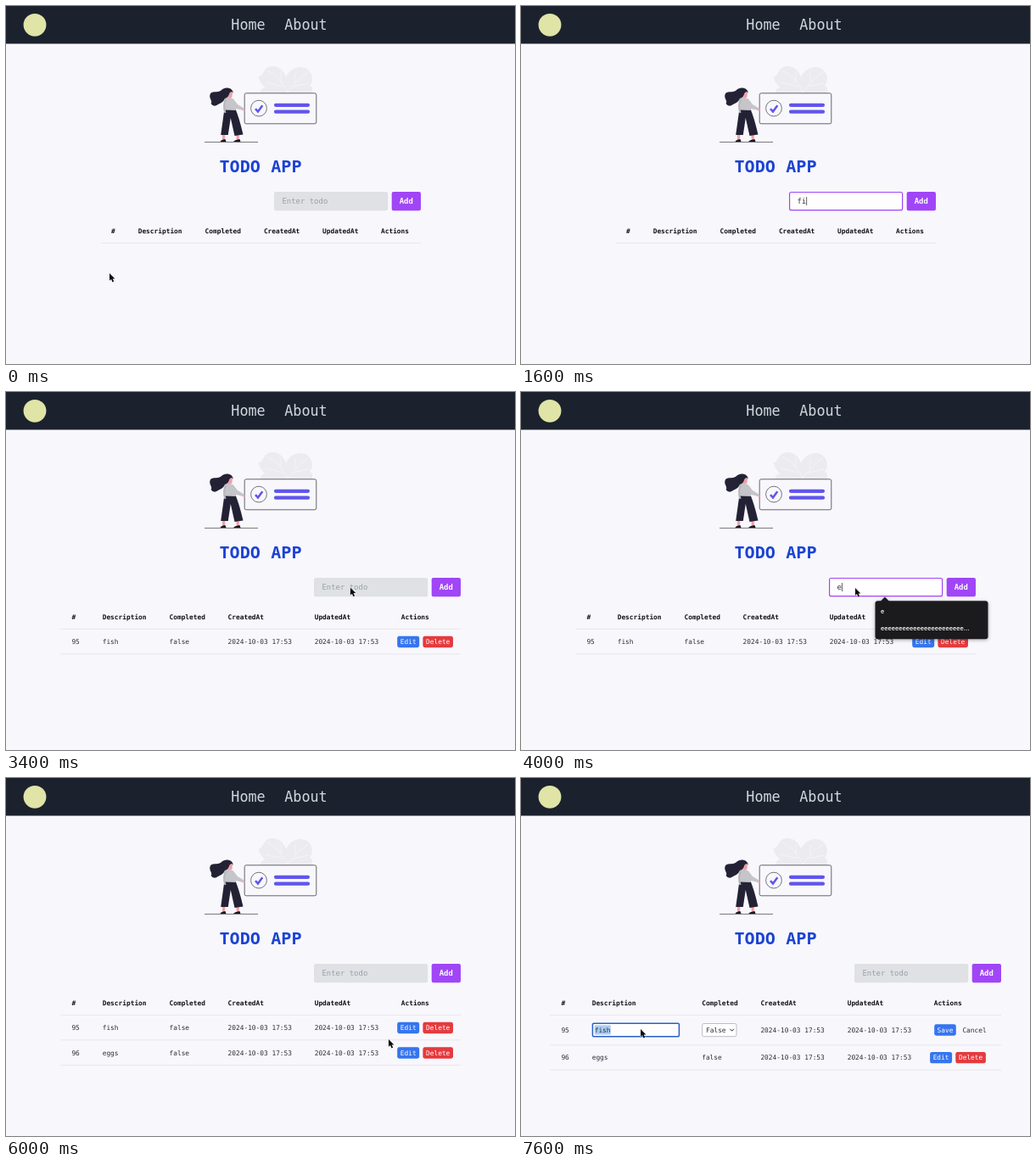
Write an HTML page that moves like this. It is 600 px wide and 422 px high and loops after 8000 ms.

```html
<!DOCTYPE html>
<html lang="en">
<head>
<meta charset="utf-8">
<title>Todo app</title>
<style>
  html, body { margin: 0; width: 100%; height: 100%; overflow: hidden; background: #f8f7fc; }
  svg { display: block; width: 600px; height: 422px; }
  text { font-family: "DejaVu Sans Mono", "Liberation Mono", monospace; font-size: 7.84px; fill: #2b2f38; white-space: pre; }
  .nav { font-size: 16.8px; fill: #d3d6dc; }
  .title { font-size: 20.16px; font-weight: 700; fill: #1b43d4; text-anchor: middle; }
  .field { font-size: 8.96px; fill: #343a46; }
  .hint { fill: #9aa0aa; }
  .add { font-size: 8.96px; font-weight: 700; fill: #fff; text-anchor: middle; }
  .head { font-weight: 700; fill: #111216; }
  .btn { fill: #fff; text-anchor: middle; }
  .menu { font-family: Inter, Roboto, sans-serif; font-size: 7.2px; font-weight: 600; fill: #f0f0f2; }
</style>
</head>
<body>
<svg viewBox="0 0 600 422">
  <rect width="600" height="422" fill="#f8f7fc"/>
  <rect width="600" height="44.5" fill="#1b222e"/>
  <circle cx="34" cy="22.3" r="13.4" fill="#e0e4a6"/>
  <text class="nav" x="265.3" y="28">Home</text>
  <text class="nav" x="328.2" y="28">About</text>

  <!-- leaves -->
  <g fill="#ecebef">
    <path d="M333 104C319 102 301 100 297.500 83C304 84 302 72 313 71C326 70 334 84 333 104Z"/>
    <path d="M331 104C324 88 332 74 346 72C359 71 365 86 358 94L361 96V104Z"/>
    <path d="M300 104C298 97 306 95 312 96L334 104Z"/>
  </g>
  <g fill="none" stroke="#f8f7fc" stroke-width=".7">
    <path d="M333 104Q325 84 308 76M324 90V77M327 95L306 90M331 104Q341 88 356 78M341 91V78M338 95L357 91"/>
  </g>

  <!-- card -->
  <rect x="281.200" y="102.800" width="84.600" height="36" rx="2" fill="#f8f7fc" stroke="#55545e" stroke-width=".9"/>
  <circle cx="298" cy="120.600" r="9.400" fill="none" stroke="#55545e" stroke-width=".8"/>
  <path d="M294 121.200L297 124.600L302.300 117.200" fill="none" stroke="#6054ef" stroke-width="2.500"/>
  <path d="M318 116.800H356M318 124.700H356" stroke="#6155ec" stroke-width="4.200" stroke-linecap="round"/>

  <!-- woman -->
  <path d="M234 160.400H297" stroke="#55545e" stroke-width=".8"/>
  <path d="M255 150H258.500L258 158H255ZM271 150H274.500L275 158H272Z" fill="#f2a0a6"/>
  <path d="M252.500 160Q253 157.500 258.500 157L259.500 160ZM268 160Q270 157.500 275.500 157L276.500 160Z" fill="#18171f"/>
  <path d="M257.500 121L270.500 121.500Q275 132 279.500 151.500L269.500 153L264.800 132L261.800 152H253.200Z" fill="#232235"/>
  <path d="M262 101L267 102L266.500 107L263 110L259.500 107Z" fill="#f2a0a6"/>
  <path d="M258 108.500Q264 106.500 268 109.500L273 116L280.500 120.500L279.500 123L271 121L270.500 123L257.500 122.500L257 114Z" fill="#c6c5c9"/>
  <path d="M259 110Q255.500 117 258.500 126" fill="none" stroke="#b7b6bb" stroke-width="2.200"/>
  <path d="M279.500 121L282.500 122.500L281 124L279 123Z" fill="#f2a0a6"/>
  <path d="M268 103Q267 100 263.500 102.500Q262 108 258 109Q256 114 250 116Q245 120 241.500 115C244 112 239 109 240.500 104.500C242 99 249 103 253.500 99.500C257 95 267 95 268 103Z" fill="#232235"/>

  <text class="title" x="300" y="196.400">TODO APP</text>
  <g id="app"></g>
  <path id="cursor" d="M0 0V8.800L2 7L3.500 10.400L5.200 9.700L3.700 6.400H6.400Z" fill="#0b0b0d" stroke="#fff" stroke-width=".7" paint-order="stroke"/>
</svg>
<script>
const LOOP = 8000, STEP = 100;
const app = document.getElementById('app');
const cursor = document.getElementById('cursor');

const layouts = {
  empty: { left: 112, right: 489, cols: [124, 155.7, 234.6, 303.9, 373, 442] },
  list: { left: 64.5, right: 536, cols: [77.4, 113.7, 192.5, 261.6, 363.7, 465.800] },
  edit: { left: 34.5, right: 566, cols: [47.4, 83.7, 213.2, 282.4, 384.7, 486.700] }
};
const heads = ['#', 'Description', 'Completed', 'CreatedAt', 'UpdatedAt', 'Actions'];
const recent = ['avc', 'a', 'abc', '1234', 'aaaaaaaaa', '111'];
const matches = ['e', 'e'.repeat(23) + '...'];
const stamp = '2024-10-03 17:53';

// time, x, y of the pointer tip
const path = [
  [0, 122, 315], [100, 122, 315], [700, 383, 228], [2300, 390, 228], [2600, 439, 227], [2700, 440, 227],
  [2900, 470, 229], [3100, 470, 229], [3500, 394, 231], [4600, 394, 231], [5000, 521, 231], [5600, 521, 231],
  [6000, 451, 308], [6400, 470, 293], [6600, 470, 293], [7300, 141, 296], [LOOP, 141, 296]
];
const hidden = [[1000, 2300], [4200, 4600]];
const focus = [[800, 3000], [3600, 4900]];
const keys = [[1300, 'f'], [1600, 'fi'], [1900, 'fis'], [2100, 'fish'], [3100, ''],
  [3900, 'e'], [4100, 'eg'], [4300, 'egg'], [4500, 'eggs'], [5200, '']];

const during = (spans, t) => spans.some(([a, b]) => t >= a && t < b);

function pointer(t) {
  const i = path.findIndex(p => p[0] > t);
  const [t0, x0, y0] = path[i - 1], [t1, x1, y1] = path[i];
  const k = (t - t0) / (t1 - t0), e = k * k * (3 - 2 * k);
  return [x0 + (x1 - x0) * e, y0 + (y1 - y0) * e];
}

const text = (x, y, s, cls = '') => `<text class="${cls}" x="${x}" y="${y}">${s}</text>`;
const box = (x, y, w, h, r, fill, more = '') =>
  `<rect x="${x}" y="${y}" width="${w}" height="${h}" rx="${r}" fill="${fill}" ${more}/>`;
const line = (l, y) => `<path d="M${l.left} ${y}H${l.right}" stroke="#e4e3e9" stroke-width=".8"/>`;
const button = (x, y, w, label, fill) =>
  box(x, y - 9.3, w, 13.4, 2.4, fill) + text(x + w / 2, y, label, 'btn');

function form(t, l, [px, py]) {
  const x = l.right - 173, bx = l.right - 34.3;
  const last = keys.filter(k => k[0] <= t).pop() || [800, ''];
  const value = last[1], active = during(focus, t);
  const over = px > bx && px < l.right && py > 219 && py < 241;
  const ring = active ? 'stroke="#a046f5" stroke-width="1.2"' : '';
  let out = active ? box(x + .6, 219.5, 133, 21.2, 2, '#fff', ring) : box(x, 219, 134.2, 22.2, 2.2, '#dfe1e5');
  out += text(x + 9.4, 232.8, value || 'Enter todo', value ? 'field' : 'field hint');
  if (active && value && (t - last[0]) % 1000 < 500)
    out += box(x + 9.6 + value.length * 5.4, 225, .7, 10, 0, '#222');
  out += box(bx, 219, 34.3, 22.2, 2.2, over ? '#b576fb' : '#a046f7');
  return out + text(bx + 17.1, 232.8, 'Add', 'add');
}

function menu(l, items, w) {
  const x = l.right - 118.5, h = items.length * 20 + 5;
  return `<g style="filter:drop-shadow(0 1px 2px #0005)">${box(x, 246.3, w, h, 3, '#1b1a1d')}
    <path d="M${x + 6} 247L${x + 11.4} 241.6L${x + 16.800} 247Z" fill="#1b1a1d"/></g>` +
    items.map((s, i) => text(x + 6.5, 261.2 + i * 20, s, 'menu')).join('');
}

function row(l, y, id, name, editing) {
  const [c0, c1, c2, c3, c4, c5] = l.cols;
  const bx = c5 - 4.6;
  return text(c0, y, id) + text(c3, y, stamp) + text(c4, y, stamp) + (editing ||
    text(c1, y, name) + text(c2, y, 'false') +
    button(bx, y, 26, 'Edit', '#3575ef') + button(bx + 30.200, y, 35.600, 'Delete', '#e53a3e'));
}

function editor(t, y) {
  const focused = t >= 7400;
  const ring = focused ? 'stroke="#2860c8" stroke-width="1.5"' : 'stroke="#85858a" stroke-width=".7"';
  return box(84.4, 289.2, 102, 15.6, 1.5, '#fff', ring) +
    (t >= 7500 ? box(86.700, 291.4, 19, 11.2, 0, '#a9ccf5') : '') +
    text(86.700, y, 'fish') +
    box(213.6, 289.5, 40.4, 15.2, 2, '#fff', 'stroke="#a5a5aa" stroke-width=".7"') +
    text(218, y, 'False') +
    '<path d="M246.500 295.800L248.700 298.200L250.900 295.800" fill="none" stroke="#222" stroke-width="1"/>' +
    button(487.2, y, 25.6, 'Save', '#3575ef') + text(520.4, y, 'Cancel');
}

function draw(t) {
  const editing = t >= 6600;
  const l = editing ? layouts.edit : t >= 3100 ? layouts.list : layouts.empty;
  const tip = pointer(t);
  let out = form(t, l, tip) + line(l, 279.4);
  heads.forEach((s, i) => out += text(l.cols[i], 267.5, s, 'head'));
  if (t >= 3100) {
    const y = editing ? 299.6 : 297.1;
    out += row(l, y, 95, 'fish', editing && editor(t, y)) + line(l, editing ? 314.800 : 308.8);
  }
  if (t >= 5200) {
    const y = editing ? 332.2 : 326.6;
    out += row(l, y, 96, 'eggs') + line(l, y + 12);
  }
  if (during([[900, 1300], [3600, 3900]], t)) out += menu(l, recent, 87);
  if (during([[3900, 4100]], t)) out += menu(l, matches, 133);
  app.innerHTML = out;
  cursor.setAttribute('transform', `translate(${tip})`);
  cursor.style.visibility = during(hidden, t) ? 'hidden' : 'visible';
}

const start = performance.now();
let shown = -1;
function tick() {
  const t = Math.floor((performance.now() - start) % LOOP / STEP) * STEP;
  if (t !== shown) draw(shown = t);
  requestAnimationFrame(tick);
}
tick();
</script>
</body>
</html>
```
